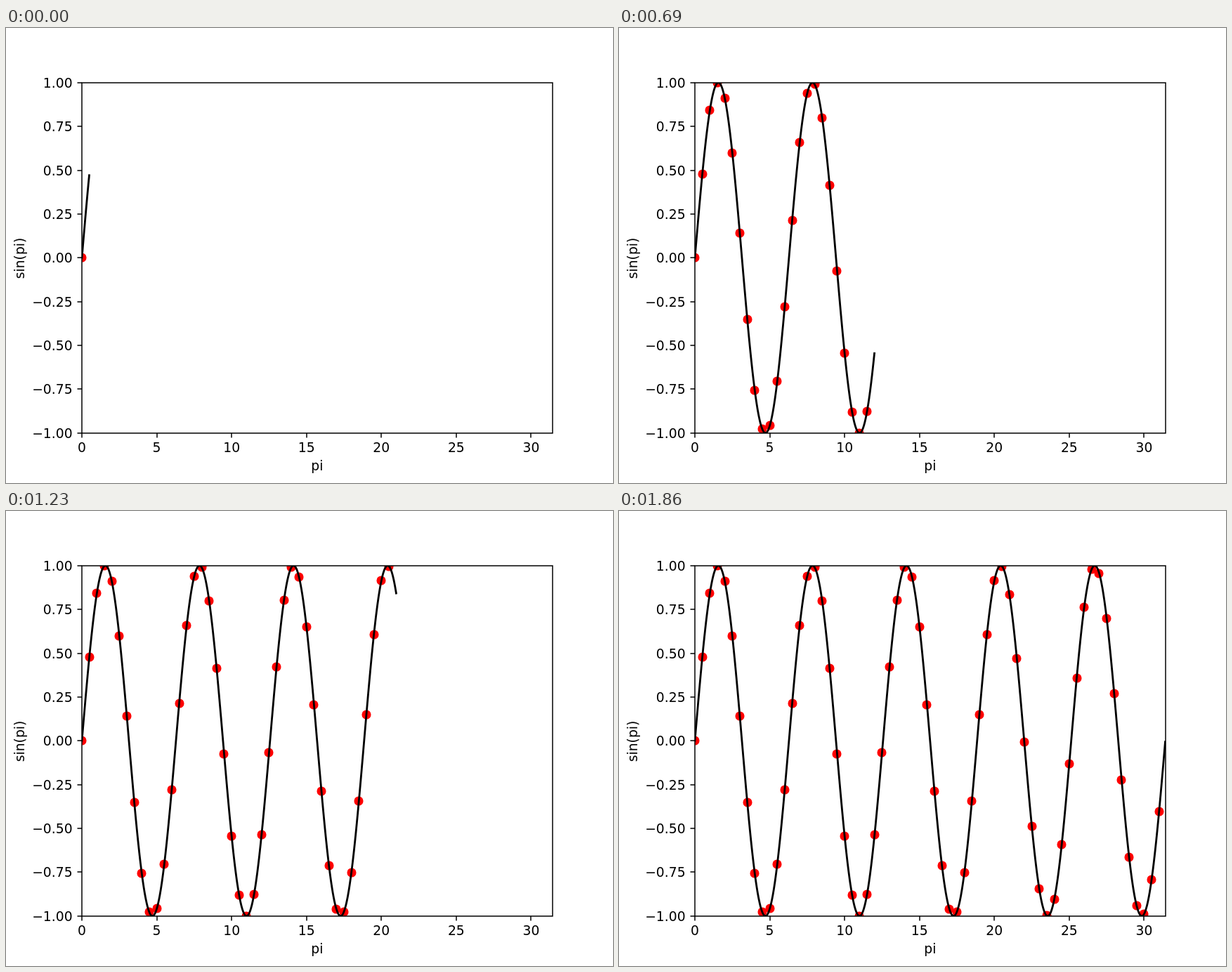
An HTML page with a canvas that plays this animation: 864 px wide and 648 px high, repeating every 1890 ms.

```html
<!DOCTYPE html>
<html lang="en">
<head>
<meta charset="utf-8">
<title>Sine plot</title>
<style>
html, body { margin: 0; width: 100%; height: 100%; overflow: hidden; background: #fff; }
canvas { display: block; }
</style>
</head>
<body>
<canvas id="stage" width="864" height="648"></canvas>
<script>
const ctx = document.getElementById('stage').getContext('2d');
const STEP_MS = 30, STEPS = 63, X_MAX = 10 * Math.PI;
const LEFT = 108, RIGHT = 778, TOP = 78, BOTTOM = 577;

const px = x => 108 + x / X_MAX * 669.6;
const py = y => 327.24 - y * 249.48;

function label(text, x, y, align) {
  ctx.textAlign = align;
  ctx.fillText(text, x, y);
}

function drawAxes() {
  ctx.fillStyle = ctx.strokeStyle = '#000';
  ctx.lineWidth = 1.5;
  ctx.lineCap = 'butt';
  ctx.lineJoin = 'miter';
  ctx.font = '18.75px "DejaVu Sans", sans-serif';
  ctx.strokeRect(LEFT, TOP, RIGHT - LEFT, BOTTOM - TOP);

  ctx.beginPath();
  for (let v = 0; v <= 30; v += 5) {
    const x = Math.round(px(v));
    ctx.moveTo(x, BOTTOM);
    ctx.lineTo(x, BOTTOM + 6.5);
    label(v, px(v), 604, 'center');
  }
  for (let v = -1; v <= 1; v += 0.25) {
    const y = Math.round(py(v));
    ctx.moveTo(LEFT, y);
    ctx.lineTo(LEFT - 6.5, y);
    label(v.toFixed(2).replace('-', '\u2212'), 94.6, Math.round(py(v) + 7), 'right');
  }
  ctx.stroke();

  label('pi', px(X_MAX / 2), 630, 'center');
  ctx.save();
  ctx.translate(26, 328);
  ctx.rotate(-Math.PI / 2);
  label('sin(pi)', 0, 0, 'center');
  ctx.restore();
}

function drawCurve(step) {
  ctx.save();
  ctx.beginPath();
  ctx.rect(LEFT, TOP, RIGHT - LEFT, BOTTOM - TOP);
  ctx.clip();

  ctx.fillStyle = '#f00';
  for (let i = 0; i <= step; i++) {
    const x = i / 2;
    ctx.beginPath();
    ctx.arc(Math.round(px(x)), Math.round(py(Math.sin(x))), 6.56, 0, 2 * Math.PI);
    ctx.fill();
  }

  ctx.strokeStyle = '#000';
  ctx.lineWidth = 2.81;
  ctx.lineCap = 'square';
  ctx.lineJoin = 'round';
  ctx.beginPath();
  for (let i = 0; i < 50 * (step + 1) && i / 100 < X_MAX; i++) {
    ctx.lineTo(px(i / 100), py(Math.sin(i / 100)));
  }
  ctx.stroke();
  ctx.restore();
}

function draw() {
  const step = Math.floor(performance.now() / STEP_MS) % STEPS;
  ctx.fillStyle = '#fff';
  ctx.fillRect(0, 0, 864, 648);
  drawCurve(step);
  drawAxes();
  requestAnimationFrame(draw);
}
draw();
</script>
</body>
</html>
```
